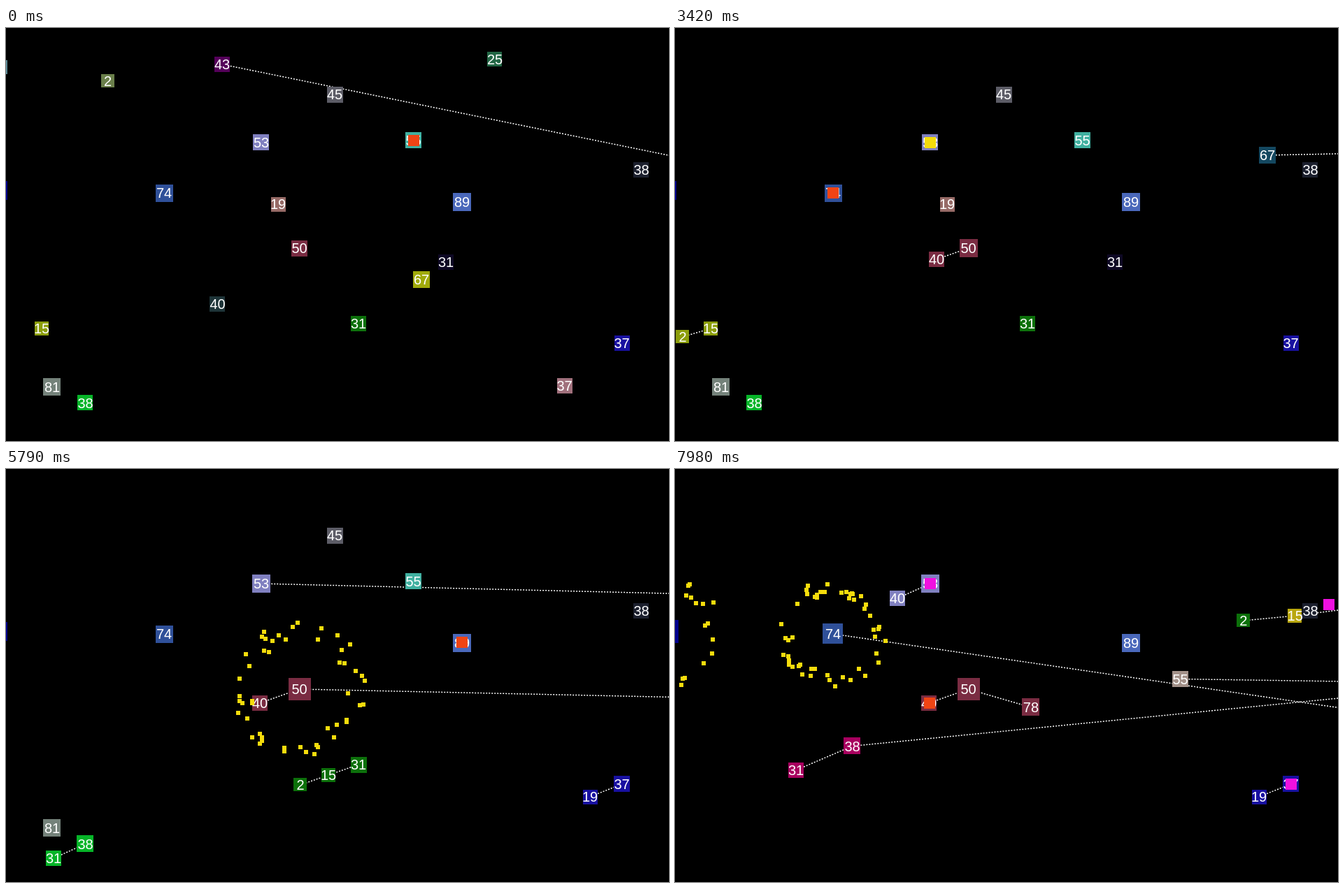
Write an HTML page with a canvas that moves like this. It is 948 px wide and 591 px high and loops after 8 s.

```html
<!DOCTYPE html>
<html lang="en">
<head>
<meta charset="utf-8">
<style>
html, body { margin: 0; width: 100%; height: 100%; overflow: hidden; background: #000; }
canvas { display: block; }
</style>
</head>
<body>
<canvas id="stage" width="948" height="591"></canvas>
<script>
const ctx = document.getElementById('stage').getContext('2d');
const LOOP = 8000;
const SPEED = 0.5; // px per ms on each axis
const HOLD = 70; // ms a burst stays a square before it spreads
const YELLOW = '#f5dc0c', ORANGE = '#f04414', MAGENTA = '#f010e0';
const nodes = [], bursts = [], marks = [];

function node(value, x, y, color) {
  const n = { value, x, y, color, moves: [], links: [] };
  nodes.push(n);
  return n;
}

// From time t on: each axis heads for its target at its own constant speed.
function go(n, t, x, y, vx = SPEED, vy = vx) {
  n.moves.push({ t, x, y, vx, vy });
}

// The child joins a parent node after a burst there.
function capture(child, t, parent) {
  child.links.push({ t: t + HOLD, parent });
  burst(t, parent.x, parent.y);
}

// The child joins a point beyond the stage and takes its colour.
function captureFar(child, t, x, y, color) {
  child.links.push({ t, parent: { x, y }, color });
}

function burst(t, x, y) { bursts.push({ t, x, y, seed: bursts.length * 977 + 13 }); }

function mark(color, from, to, x, y) { marks.push({ color, from, to, x, y }); }

function approach(a, b, step) {
  return a + Math.sign(b - a) * Math.min(Math.abs(b - a), step);
}

function place(n, t) {
  let { x, y } = n;
  n.moves.forEach((m, i) => {
    if (t <= m.t) return;
    const next = n.moves[i + 1];
    const dt = Math.min(t, next ? next.t : Infinity) - m.t;
    x = approach(x, m.x, m.vx * dt);
    y = approach(y, m.y, m.vy * dt);
  });
  return { x, y };
}

function linkAt(n, t) {
  return n.links.filter(l => l.t <= t).pop();
}

// Colour passes down from the parent, until the child's fixAt time.
function colorAt(n, t) {
  const link = linkAt(n, t);
  if (!link) return n.color;
  return link.color || colorAt(link.parent, Math.min(t, n.fixAt ?? Infinity));
}

function massAt(n, t) {
  return nodes.reduce((sum, c) => {
    const link = linkAt(c, t);
    return link && link.parent === n ? sum + massAt(c, t) : sum;
  }, n.value);
}

// Nodes that never move
const edge = node(104, -11.5, 232.5, '#00008c');
const n50 = node(50, 419.5, 315, '#7a2c42');
const n53 = node(53, 365, 164, '#8080c0');
const n74 = node(74, 226, 236, '#2f5099');
const n37 = node(37, 880.5, 451, '#1810a0');
node(89, 652, 248.5, '#4a68bb');

// Nodes pulled out to the right
const n43 = node(43, 309, 52, '#55005a');
captureFar(n43, -500, 1746, 345, '#55005a');
go(n43, 286, 1700, 369);

const n4 = node(4, -8, 56, '#5a8894');
captureFar(n4, 60, 1746, 26, '#24507e');
go(n4, 470, 1700, 52);

const n25 = node(25, 699, 45, '#226644');
captureFar(n25, 1340, 1700, 330, '#3a5530');
go(n25, 1500, 1650, 350);

const pink = node(37, 798.5, 512, '#a0707c');
captureFar(pink, 2500, 1700, 400, '#144860');
go(pink, 2700, 1650, 420);

const n67 = node(67, 594, 360, '#a0aa0a');
captureFar(n67, 2500, 1750, 164, '#144860');
go(n67, 2914, 1700, 182);

const n45 = node(45, 470, 95, '#5c5c66');
captureFar(n45, 6300, 1750, 229, '#3a5530');
go(n45, 6538, 1700, 233);

const n55 = node(55, 582.5, 160.5, '#40b0a0');
captureFar(n55, 7300, 1750, 316, '#a39189');
go(n55, 7700, 1700, 305);

// Chain 2 - 15 - 31
const n2 = node(2, 145.5, 75.5, '#6a7f4a');
const n15 = node(15, 51, 430, '#8c9e0c');
const n31 = node(31, 504, 423, '#0c700a');
capture(n2, 345, n15);
n2.fixAt = 6500;
go(n2, 794, 11, 442);
go(n2, 3982, 474.5, 452);
go(n2, 4909, 421, 452);
go(n2, 6969, 1400, 217, 0.337, 0.215);
go(n2, 7230, 1400, 217, 0.405, 0.24);
capture(n15, 3600, n31);
go(n15, 3972, 504, 438);
go(n15, 4878, 461, 438);
go(n15, 6969, 1400, 210, 0.421, 0.352);
captureFar(n31, 6600, 2470, 170, '#b9a70f');
go(n31, 6969, 2400, 194);
burst(4880, 483, 438);

// Children of 50
const n40 = node(40, 302.5, 395, '#1e3438');
capture(n40, 474, n50);
go(n40, 884, 419, 331);
go(n40, 1118, 374, 331);
go(n40, 4940, 363, 335);
const n78 = node(78, 1650, 350, '#444');
capture(n78, 4940, n50);
go(n78, 5747, 476, 341, 0.511);

// Child of 53
const far40 = node(40, 1800, 150, '#444');
capture(far40, 3380, n53);
go(far40, 4656, 318, 185);

// Child of the blue 37
const n19 = node(19, 389, 252, '#966a66');
capture(n19, 3690, n37);
go(n19, 4096, 835, 469);

// Green 38 and its child
const leaf = node(31, 629, 335, '#0e0824');
const n38 = node(38, 113.5, 536.5, '#06b428');
capture(leaf, 4010, n38);
go(leaf, 4280, 68, 557);
go(leaf, 7700, 600, 300, 0.375, 0.45);
captureFar(n38, 7400, 1700, 254, '#a8005f');
go(n38, 7700, 1600, 280);

// Child of the node cut by the left edge
const n81 = node(81, 66, 513.5, '#74827a');
capture(n81, 7278, edge);
go(n81, 7700, -75, 258);

capture(node(62, 1500, 422, '#444'), 7278, n74);
node(38, 908.5, 203, '#1c202e');

mark(ORANGE, 0, 200, 582.5, 160.5);
mark(MAGENTA, 1050, 1340, 699, 45);
mark(MAGENTA, 1050, 1340, 652, 248);
mark(MAGENTA, 2200, 2500, 798.5, 512);
mark(ORANGE, 2700, 3000, 470, 95);
mark(ORANGE, 3200, 3480, 226, 236);
mark(MAGENTA, 4780, 5060, 731.5, 469.5);
mark(ORANGE, 5700, 5980, 652, 248);
mark(MAGENTA, 7120, 7400, 68, 557.5);
mark(MAGENTA, 7832, 8000, 935, 194);
mark(MAGENTA, 7850, 8000, 365, 164);
mark(MAGENTA, 7850, 8000, 881, 451);
mark(ORANGE, 7850, 8000, 363.5, 335);

function square(x, y, size, color) {
  ctx.fillStyle = color;
  ctx.fillRect(Math.round(x - size / 2), Math.round(y - size / 2), Math.round(size), Math.round(size));
}

function random(seed) {
  return () => {
    seed = (seed * 16807 + 11) % 2147483647;
    return seed / 2147483647;
  };
}

function drawLink(n, t) {
  const link = linkAt(n, t);
  if (!link) return;
  const a = link.color ? link.parent : place(link.parent, t);
  const b = place(n, t);
  ctx.beginPath();
  ctx.moveTo(b.x, b.y);
  ctx.lineTo(a.x, a.y);
  ctx.stroke();
}

function drawNode(n, t) {
  const { x, y } = place(n, t);
  if (x < -40 || x > 990) return;
  square(x, y, 19.2 + 0.075 * massAt(n, t), colorAt(n, t));
  if (n === edge) return;
  ctx.fillStyle = '#fff';
  ctx.fillText(n.value, x, y + 7);
}

function drawBurst(b, t) {
  const age = t - b.t;
  if (age < 0 || age >= 880) return;
  if (age < HOLD) return square(b.x, b.y, 16, YELLOW);
  const rnd = random(b.seed);
  for (let i = 0; i < 5; i++) rnd();
  for (let i = 0; i < 50; i++) {
    const angle = rnd() * Math.PI * 2;
    const r = (age - HOLD) * 0.125 * (0.7 + 0.3 * rnd());
    square(b.x + r * Math.cos(angle), b.y + r * Math.sin(angle), 6, YELLOW);
  }
}

function draw(t) {
  ctx.fillStyle = '#000';
  ctx.fillRect(0, 0, 948, 591);
  ctx.strokeStyle = '#fff';
  ctx.lineWidth = 1.5;
  ctx.setLineDash([2, 2]);
  ctx.font = '20px "Liberation Sans", Arial, sans-serif';
  ctx.textAlign = 'center';
  nodes.forEach(n => drawLink(n, t));
  nodes.forEach(n => drawNode(n, t));
  bursts.forEach(b => drawBurst(b, t));
  marks.forEach(m => {
    if (t >= m.from && t < m.to) square(m.x, m.y, 16, m.color);
  });
}

let start;
function frame(now) {
  start ??= now;
  draw(Math.floor(((now - start) % LOOP) / 30) * 30);
  requestAnimationFrame(frame);
}
draw(0);
requestAnimationFrame(frame);
</script>
</body>
</html>
```
